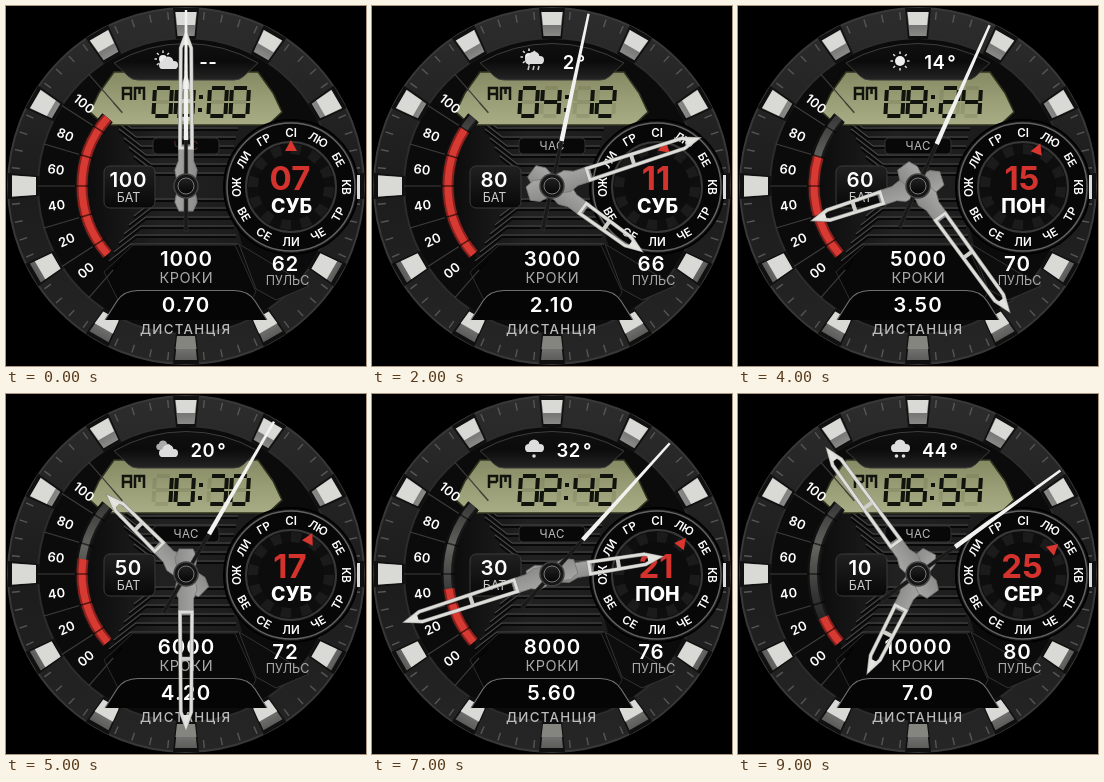
Recreate the animation shown at these times as an HTML page with a canvas. Size 360 by 360 pixels, loop 10 s.

```html
<!DOCTYPE html>
<html lang="uk">
<head>
<meta charset="utf-8">
<title>Годинник</title>
<style>
html, body { margin: 0; width: 100%; height: 100%; overflow: hidden; background: #000; }
canvas { display: block; width: 360px; height: 360px; }
</style>
</head>
<body>
<canvas id="face" width="360" height="360"></canvas>
<script>
const ctx = document.getElementById('face').getContext('2d');
const RAD = Math.PI / 180, C = 180;
const FONT = 'Inter, Roboto, sans-serif';
const MONTHS = ['СІ', 'ЛЮ', 'БЕ', 'КВ', 'ТР', 'ЧЕ', 'ЛИ', 'СЕ', 'ВЕ', 'ОЖ', 'ЛИ', 'ГР'];
const DAYS = ['СЕР', 'ПОН', 'СУБ'];
const WEATHER = [
  { sun: 1, cloud: 1 },
  { sun: 1, cloud: 1, rain: 3 },
  { sun: 1, cloud: 1, snow: 2 },
  { sun: 1 },
  { cloud: 2 },
  { cloud: 1, rain: 1 },
  { cloud: 1, snow: 1 },
  { cloud: 1, rain: 3 },
  { cloud: 1, snow: 2 },
];
// Lit segments in the order a b c d e f g, a being the highest bit
const SEGMENTS = [0x7e, 0x30, 0x6d, 0x79, 0x33, 0x5b, 0x5f, 0x70, 0x7f, 0x7b];

function gradient(x0, y0, x1, y1, ...colors) {
  const g = ctx.createLinearGradient(x0, y0, x1, y1);
  colors.forEach((c, i) => g.addColorStop(i / (colors.length - 1), c));
  return g;
}

function paint(fill, stroke, width = 1) {
  if (fill) { ctx.fillStyle = fill; ctx.fill(); }
  if (stroke) { ctx.strokeStyle = stroke; ctx.lineWidth = width; ctx.stroke(); }
}

function poly(points, fill, stroke, width, open) {
  ctx.beginPath();
  points.forEach(([x, y]) => ctx.lineTo(x, y));
  if (!open) ctx.closePath();
  paint(fill, stroke, width);
}

const line = (points, color, width) => poly(points, null, color, width, true);

function circle(x, y, r, fill, stroke, width) {
  ctx.beginPath();
  ctx.arc(x, y, r, 0, 2 * Math.PI);
  paint(fill, stroke, width);
}

function box(x, y, w, h, r, fill, stroke) {
  ctx.beginPath();
  ctx.roundRect(x, y, w, h, r);
  paint(fill, stroke);
}

function text(str, x, y, size, color = '#fff', weight = 600, spacing = 0) {
  ctx.font = `${weight} ${size}px ${FONT}`;
  ctx.letterSpacing = spacing + 'px';
  ctx.textAlign = 'center';
  ctx.fillStyle = color;
  ctx.fillText(str, x + spacing / 2, y);
}

function at(x, y, degrees, draw) {
  ctx.save();
  ctx.translate(x, y);
  ctx.rotate(degrees * RAD);
  draw();
  ctx.restore();
}

// Hour block whose side face is always on the lower side of the screen
function drawMarker(hour) {
  const shade = 11 * Math.cos(hour * 30 * RAD);
  const outer = -174 - Math.min(0, shade), inner = -150 - Math.max(0, shade);
  at(C, C, hour * 30, () => {
    poly([[-13, -178], [13, -178], [10, -147], [-10, -147]], '#101010');
    poly([[-11, -174], [11, -174], [8.5, -150], [-8.5, -150]],
      gradient(0, -174, 0, -150, '#5c5c5a', '#8a8a88'));
    poly([[-10.5, outer], [10.5, outer], [9, inner], [-9, inner]],
      hour === 6 ? '#85857f' : '#d9d9d6');
  });
}

function drawDial() {
  ctx.fillStyle = '#000';
  ctx.fillRect(0, 0, 360, 360);
  circle(C, C, 178, gradient(0, 0, 0, 360, '#2d2d2d', '#1c1c1c', '#262626'), '#383838', 2);
  circle(C, C, 148, '#0b0b0b', '#2c2c2c', 2);
  for (let m = 0; m < 60; m++) {
    at(C, C, m * 6, () => line([[0, -175], [0, -167]], '#565656', 1.4));
  }
  for (let h = 0; h < 12; h++) drawMarker(h);
}

function drawRidges() {
  poly([[97, 119], [263, 119], [226, 150], [219, 180], [236, 238], [127, 238], [106, 255],
    [82, 215], [76, 180], [82, 145]], gradient(80, 0, 235, 0, '#0c0c0c', '#212121', '#1c1c1c'));
  for (let k = 0; k < 6; k++) {
    const dy = 13 + k * 9, x = 150 - k * 5;
    for (const s of [-1, 1]) {
      const y = C + s * dy;
      line([[x - 22, y + s * 17], [x, y], [222 + k * 2, y]], '#484848', 1.2);
      line([[x - 22, y + s * 17 + 2], [x, y + 2], [222 + k * 2, y + 2]], '#080808', 2);
    }
  }
}

function drawPanels() {
  poly([[98, 266], [127, 239], [229, 239], [250, 286], [236, 310], [120, 310]],
    '#080808', '#2c2c2c');
  poly([[233, 238], [250, 283], [270, 294], [303, 280]], '#0d0d0d', '#333');
  ctx.beginPath();
  ctx.moveTo(99, 314);
  ctx.lineTo(111, 295);
  ctx.quadraticCurveTo(118, 284.5, 132, 284.5);
  ctx.lineTo(228, 284.5);
  ctx.quadraticCurveTo(242, 284.5, 249, 295);
  ctx.lineTo(261, 314);
  paint('#050505', '#707070', 1.2);
}

function drawDisplay() {
  poly([[84, 106], [93, 87], [108, 66], [252, 66], [267, 87], [276, 106], [262, 119], [98, 119]],
    gradient(0, 66, 0, 119, '#868a64', '#989d75', '#a8ad85'), '#31341f', 1.5);
  ctx.beginPath();
  ctx.arc(C, C, 142.5, 239.7 * RAD, 300.3 * RAD);
  ctx.lineTo(238, 70);
  ctx.quadraticCurveTo(234, 74, 228, 74);
  ctx.lineTo(132, 74);
  ctx.quadraticCurveTo(126, 74, 122, 70);
  ctx.closePath();
  paint(gradient(0, 37, 0, 74, '#101010', '#0b0b0b', '#242424'), '#3d3d3b');
}

function drawDigit(n, x, y, color) {
  const w = 17, h = 28, m = h / 2;
  const ends = [[2, 0, w - 2, 0], [w, 2, w, m - 1], [w, m + 1, w, h - 2], [2, h, w - 2, h],
    [0, m + 1, 0, h - 2], [0, 2, 0, m - 1], [2, m, w - 2, m]];
  ctx.save();
  ctx.transform(1, 0, -0.06, 1, x + 2, y);
  ends.forEach(([x0, y0, x1, y1], i) => {
    if (SEGMENTS[n] >> (6 - i) & 1) line([[x0, y0], [x1, y1]], color, 4);
  });
  ctx.restore();
}

function drawTime(step) {
  const minutes = step * 126, hour = Math.floor(minutes / 60);
  const pad = n => String(n).padStart(2, '0');
  const digits = pad(hour > 12 ? hour - 12 : hour) + pad(minutes % 60);
  const ink = '#11130d';
  [147, 169, 202, 224].forEach((x, i) => {
    drawDigit(8, x, 82, 'rgba(60,65,40,.13)');
    drawDigit(+digits[i], x, 82, ink);
  });
  ctx.fillStyle = ink;
  ctx.fillRect(193, 89, 4, 4);
  ctx.fillRect(192, 102, 4, 4);
  line([[117, 94], [117, 82], [125, 82], [125, hour < 12 ? 94 : 88]], ink, 2.5);
  line([[117, 88], [125, 88]], ink, 2.5);
  line([[129, 94], [129, 82], [138, 82], [138, 94]], ink, 2.5);
  line([[133.5, 82], [133.5, 88]], ink, 2.5);
}

function drawSun(x, y, r) {
  circle(x, y, r, '#eee');
  for (let a = 0; a < 360; a += 45) {
    at(x, y, a, () => line([[0, -r - 2], [0, -r - 4.5]], '#ddd', 1.5));
  }
}

function drawCloud(x, y, scale, color) {
  ctx.save();
  ctx.translate(x, y);
  ctx.scale(scale, scale);
  circle(-5, 1, 4, color);
  circle(0, -2, 5.5, color);
  circle(6, 1, 4, color);
  box(-8, 0, 17, 5, 2.5, color);
  ctx.restore();
}

function drawWeather(step) {
  const { sun, cloud, rain = 0, snow = 0 } = WEATHER[Math.max(0, step - 1)];
  const wet = rain + snow > 0;
  if (sun) cloud ? drawSun(157, wet ? 51 : 53, 4) : drawSun(162, 55, 5);
  if (cloud === 2) drawCloud(157, 52, 0.75, '#aaa');
  if (cloud) drawCloud(162, wet ? 53 : 58, 1, '#ddd');
  for (let i = 0; i < rain; i++) {
    const x = 162 + (i - (rain - 1) / 2) * 5;
    line([[x, 60], [x - 1, 64]], '#ccc', 1.5);
  }
  for (let i = 0; i < snow; i++) circle(162 + (i - (snow - 1) / 2) * 7, 62, 1.8, '#ddd');
  text(step ? `${step * 6 - 10}\u200a°` : '--', 202, 63, 18.5, '#fff', 600, 0.5);
}

function arcBand(from, to, radius, color, width) {
  ctx.beginPath();
  ctx.arc(C, C, radius, (180 - from) * RAD, (180 - to) * RAD);
  paint(null, color, width);
}

// Same as arcBand, but with angles measured downward from nine o'clock
function drawBattery(step) {
  const percent = 100 - step * 10;
  const top = 41 - 82 * Math.min(100, percent + 10) / 100;
  const dividers = [-49, -33, -16.5, 0, 16.5, 33, 49];
  dividers.forEach(a => at(C, C, a, () => line([[-148, 0], [-111, 0]], '#3c3c3c', 1.2)));
  arcBand(41, -41, 104, '#111', 14);
  arcBand(41, -41, 104, gradient(0, 105, 0, 250, '#333', '#62625e', '#343434', '#171717'), 9);
  arcBand(41, -41, 100, '#191919', 2);
  ctx.beginPath();
  ctx.arc(C, C, 104, 139 * RAD, (180 - top) * RAD);
  paint(null, '#8c201d', 11);
  paint(null, '#d63a32', 7);
  dividers.forEach(a => at(C, C, a, () => line([[-111, 0], [-97, 0]], 'rgba(0,0,0,.6)', 1.5)));
  for (let v = 0; v <= 100; v += 20) {
    at(C, C, v * 0.79 - 40, () => text(v ? String(v) : '00', -131, 5, 13));
  }
  box(98, 160, 51, 42, 6, gradient(0, 160, 0, 202, '#202020', '#080808'), '#3b3b3b');
  text(String(percent), 122, 181, 20.5, '#fff', 600, 0.6);
  text('БАТ', 122.5, 196, 12.5, '#ccc', 400);
}

function drawCalendar(step) {
  const x = 285, y = 181;
  circle(x, y, 67, '#161616', '#000', 2);
  circle(x, y, 64, '#070707', '#626262', 1.5);
  ctx.fillStyle = '#ddd';
  ctx.fillRect(351, 169, 3, 24);
  circle(x, y, 45, '#0e0e0e', '#383838', 2);
  for (let a = 0; a < 360; a += 30) {
    ctx.beginPath();
    ctx.moveTo(x, y);
    ctx.arc(x, y, 43, a * RAD, (a + 15) * RAD);
    ctx.closePath();
    paint('#1b1b1b');
  }
  circle(x, y, 33, '#0c0c0c');
  MONTHS.forEach((name, i) => at(x, y, i * 30, () => {
    ctx.translate(0, -54.5);
    if (i > 3 && i < 9) ctx.rotate(Math.PI);
    text(name, 0, 4, 11.5);
  }));
  at(x, y, step * 5.4, () => poly([[0, -47], [6, -36], [-6, -36]], '#d9362f'));
  text(String(7 + step * 2).padStart(2, '0'), 284, 183.5, 33, '#d4322d', 700);
  text(step ? DAYS[step % 3] : 'СУБ', 285.5, 207, 19.5, '#fff', 800);
}

function drawCounters(step) {
  text(String((step + 1) * 1000), 180, 260, 20.5, '#fff', 600, 1);
  text('КРОКИ', 180, 277, 14.5, '#aaa', 400, 0.6);
  text(((step + 1) * 0.7).toFixed(step === 9 ? 1 : 2), 179.5, 306, 20.5, '#fff', 600, 1.2);
  text('ДИСТАНЦІЯ', 179, 328, 13.3, '#bbb', 500, 1.3);
  text(String(62 + step * 2), 279, 265, 20.5, '#fff', 600, 0.8);
  text('ПУЛЬС', 281.5, 279, 12.5, '#aaa', 400);
}

function drawHand(degrees, length) {
  const neck = 38, shoulder = length - 17, bar = neck + (length - neck) * 0.4;
  at(C, C, degrees, () => {
    poly([[-7, 25], [7, 25], [11, 16], [8, 0], [11, -16], [7.5, -25], [7.5, -neck - 3],
      [-7.5, -neck - 3], [-7.5, -25], [-11, -16], [-8, 0], [-11, 16]],
      gradient(-11, 0, 11, 0, '#a6a6a4', '#8b8b89'), '#777', 0.8);
    const frame = [[-6, -neck], [-5.2, -shoulder], [0, -length + 3], [5.2, -shoulder], [6, -neck]];
    poly(frame, null, '#8e8e8b', 4);
    poly(frame, null, '#dededa', 2.8);
    line([[-5, -bar], [5, -bar]], '#cfcfcb', 4);
    poly([[-3, -length + 14], [0, -length], [3, -length + 14]], '#e4e4e0');
  });
}

function drawSecond(step) {
  at(C, C, step * 6, () => {
    poly([[-2, 45], [2, 45], [1.6, -46], [-1.6, -46]], '#191919', '#333', 0.6);
    poly([[-2.3, -46], [2.3, -46], [1.2, -176], [-1.2, -176]], '#f2f2f0');
  });
}

function draw(step) {
  drawDial();
  drawRidges();
  drawPanels();
  drawDisplay();
  drawTime(step);
  drawWeather(step);
  box(147, 132, 66, 16, 4, '#080808', '#303030');
  text('ЧАС', 180, 144, 11.5, step ? '#bbb' : '#4a2c2a', 400, 0.5);
  drawBattery(step);
  drawCalendar(step);
  drawCounters(step);
  drawHand(step * 63, 111);
  drawHand(step * 36, 155);
  drawSecond(step);
  circle(C, C, 12, '#161616', '#444', 1.5);
  circle(C, C, 8, gradient(0, 172, 0, 188, '#222', '#050505'), '#777', 1);
}

function tick() {
  draw(Math.floor(performance.now() / 1000) % 10);
  requestAnimationFrame(tick);
}
tick();
</script>
</body>
</html>
```
